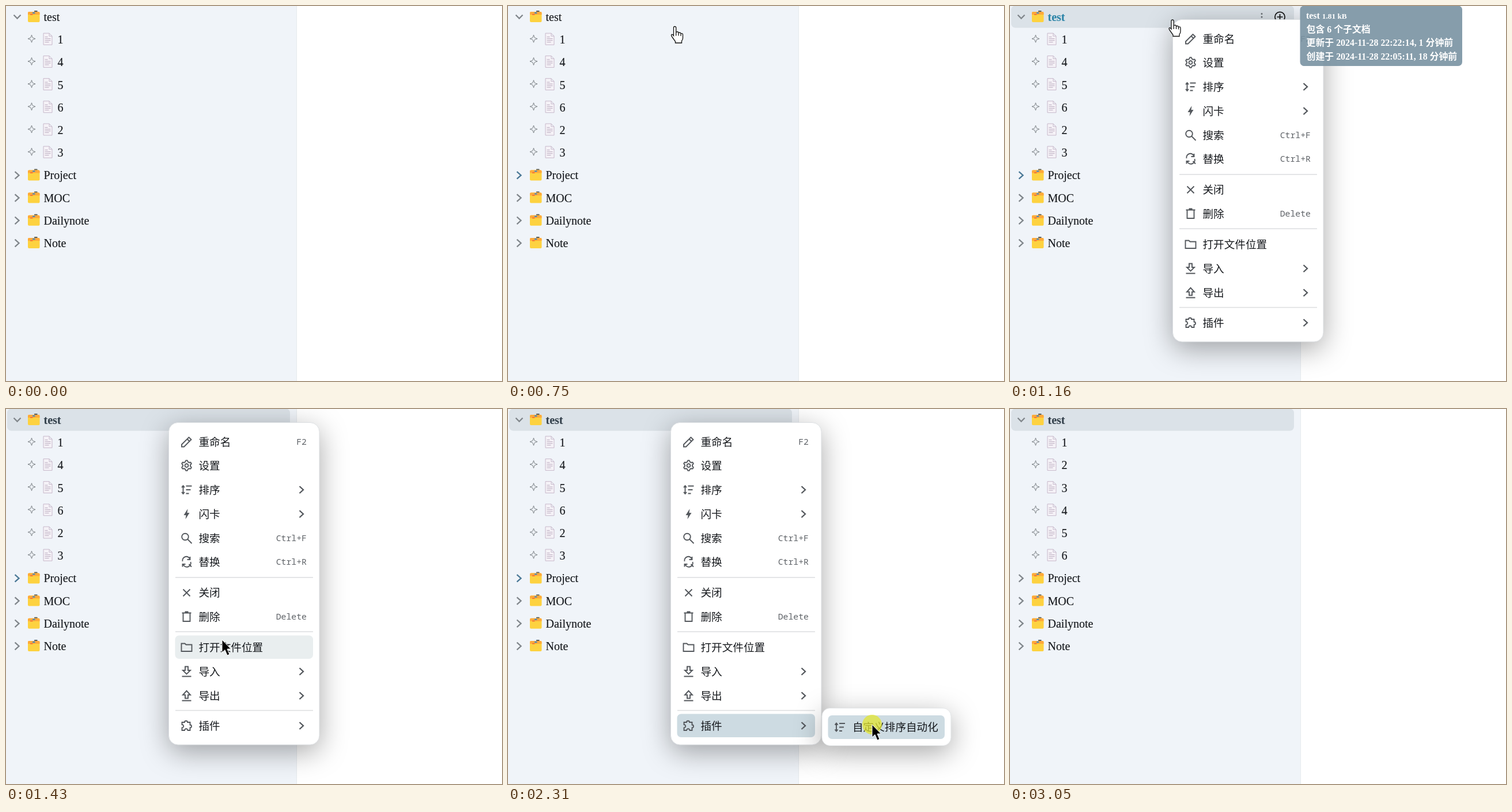
An HTML page that plays this animation: 861 by 650 pixels, repeating every 3710 ms.

```html
<!DOCTYPE html>
<html lang="zh-CN">
<head>
<meta charset="utf-8">
<style>
html, body { margin: 0; width: 100%; height: 100%; overflow: hidden; background: #fff }
svg { display: block; width: 861px; height: 650px }
text { font: 20px "Liberation Serif", "Noto Sans CJK SC", "Noto Sans CJK", serif; fill: #16191d; stroke: #16191d; stroke-width: .15px; white-space: pre }
text.b { font-weight: bold; stroke: none }
text.tip { font-size: 15.9px; font-weight: bold; fill: #fff; stroke: none }
.tip .small { font-size: 13.3px }
text.item { font-size: 18.6px; font-family: "Noto Sans CJK SC", "Noto Sans CJK", sans-serif; stroke: none }
text.key { font: 14.8px "Noto Sans Mono", monospace; fill: #5f6368; stroke: none; text-anchor: end }
.line { fill: none; stroke: #54585d; stroke-width: 1.9 }
.panel { filter: drop-shadow(0 12px 24px rgba(0,0,0,.34)) }
</style>
</head>
<body>
<svg id="stage" viewBox="0 0 861 650"></svg>
<script>
const LOOP = 3710, ROW = 39.2;
const HOVER = '#e9eeef', FOCUS = '#dbe2e8', ACTIVE = '#cddbe2';
const FOLDERS = ['Project', 'MOC', 'Dailynote', 'Note'];

// The screen refreshes in bursts: [first, last, count], on a 10 ms clock
const steps = [0];
for (const [a, b, n] of [[130, 610, 8], [680, 750, 2], [820, 1160, 5], [1210, 1700, 8], [1770, 2180, 7], [2310, 2510, 4], [2910, 3050, 3]])
  for (let i = 0; i < n; i++) steps.push(Math.floor((a + (b - a) * i / (n - 1)) / 10) * 10);

// Pointer path: time, x, y
const path = [
  [130, 585, 575], [190, 500, 425], [260, 425, 300], [330, 378, 205], [400, 354, 140],
  [470, 343, 104], [540, 328, 76], [610, 309, 56], [680, 297, 44], [750, 289.5, 35.5],
  [900, 284, 27], [1160, 282, 24], [1280, 308, 120], [1420, 375, 400], [1490, 405, 535],
  [1560, 430, 552], [1700, 484, 600], [1770, 492, 590], [1840, 512, 562], [1980, 575, 552],
  [2180, 632, 547], [2842, 632, 547], [2910, 640, 562], [2980, 655, 592]
];

const icons = {
  edit: 'M-8.5 8.5V4.5L4-8l4 4L-4.5 8.5zM1-5l4 4',
  gear: gear(),
  sort: 'M-6-6V6M-8.5-4L-6-7l2.5 3M-8.5 4L-6 7l2.5-3M-1-6.5H9M-1 0H7M-1 6.5H4',
  flash: 'M2-9L-5 2H-1L-2 9 5-2H1z',
  search: 'M3.3-2.5A5.8 5.8 0 1 1-8.3-2.5A5.8 5.8 0 1 1 3.3-2.5M2 2l7 7',
  replace: 'M-7-1A6.5 6.5 0 0 1 6-4M6-9v5H1M7 0A5.5 5.5 0 0 1-6 4M-7 8.5V4h5M4 4l4.5 4.5',
  close: 'M-6-6L6 6M6-6L-6 6',
  trash: 'M-6-6.5V8H6V-6.5M-8-6.5H8M-3-8.5H3',
  folder: 'M-9-6.5h6l2 2H9V7H-9z',
  load: 'M-8 8.5H8M-2.5-8.5V-2H-6.5L0 4.5 6.5-2H2.5V-8.5z',
  save: 'M-8 8.5H8M-2.5 4.5V-1.5H-6.5L0-8.5 6.5-1.5H2.5V4.5z',
  plugin: 'M-8-6H-3.5A2.4 2.4 0 1 1 1.5-6H6V-1.5A2.4 2.4 0 1 1 6 3.5V8H2A2.6 2.6 0 0 0-3.5 8H-8V3.5A2.6 2.6 0 0 0-8-2z'
};

// centre y, icon, label, shortcut ('>' opens a submenu)
const menu = [
  [57, 'edit', '重命名', 'F2'], [98, 'gear', '设置'], [140, 'sort', '排序', '>'],
  [182, 'flash', '闪卡', '>'], [224, 'search', '搜索', 'Ctrl+F'], [265, 'replace', '替换', 'Ctrl+R'],
  [318.5, 'close', '关闭'], [360, 'trash', '删除', 'Delete'], [413, 'folder', '打开文件位置'],
  [455, 'load', '导入', '>'], [497, 'save', '导出', '>'], [549, 'plugin', '插件', '>']
];

function gear() {
  const pts = [];
  for (let i = 0; i < 24; i++) {
    const r = i % 4 < 2 ? 9 : 6.6, a = (i - .5) * Math.PI / 12 - Math.PI / 2;
    pts.push((r * Math.cos(a)).toFixed(1) + ' ' + (r * Math.sin(a)).toFixed(1));
  }
  return 'M' + pts.join('L') + 'zM3 0A3 3 0 1 1-3 0A3 3 0 1 1 3 0';
}

const rect = (x, y, w, h, r, fill, more = '') =>
  `<rect x="${x}" y="${y}" width="${w}" height="${h}" rx="${r}" fill="${fill}" ${more}/>`;
const at = (x, y, s) => `<g transform="translate(${x} ${y})">${s}</g>`;
const text = (x, y, s, cls = '', style = '') => `<text x="${x}" y="${y}" class="${cls}" style="${style}">${s}</text>`;
const line = (d, style = '') => `<path d="${d}" class="line" style="${style}"/>`;
const icon = (x, y, name) => at(x, y, line(icons[name], name === 'flash' ? 'fill:#54585d;stroke:none' : ''));

const folderIcon = rect(49, -11, 5.5, 3, .5, '#59605f') + rect(38, -9, 20.5, 18, 2, '#fdd240') +
  '<path d="M38-4V-7q0-2 2-2H56.5q2 0 2 2V-4z" fill="#ffa93a"/>' +
  rect(46, -8, 4.5, 2, 0, '#3f86c4') + rect(42, -5, 4.5, 1.5, 0, '#ef6238');
const starIcon = at(44.5, -1.5, line('M0-6.5L1.7-1.7 6.5 0 1.7 1.7 0 6.5-1.7 1.7-6.5 0-1.7-1.7z', 'stroke:#70757a;stroke-width:.9'));
const docIcon = '<path d="M65-11H75l5 5V9H65zM75-11v5h5" fill="#f5f2f7" stroke="#c7b8ca"/>' +
  line('M67.5-4.5h5M67.5-1.5h10M67.5 1.5h10M67.5 4.5h7', 'stroke:#b8a8bd;stroke-width:1');
const rowTools = '<path d="M437-5.5v.01M437 0v.01M437 5.5v.01" stroke="#6b7075" stroke-width="3" stroke-linecap="round"/>' +
  '<circle cx="468.5" r="8.6" class="line" style="stroke:#111;stroke-width:1.7"/>' + line('M463.5 0h10M468.5-5v10', 'stroke:#111;stroke-width:1.7');

const hand = '<path d="M-2 2Q-2 0 0 0T2.2 2V10Q6 8 6.5 11Q10 9.5 10.5 12.5Q14 11 14 14.5V20Q14 23 12 25V28.5H1V26L-4 19Q-7 15-5.5 14Q-4 13-2 16ZM2.2 10v6M6.5 11v5M10.5 12.5v4" fill="#fff" stroke="#111" stroke-width="1.3"/>';
const arrow = '<path d="M0 0V22L5 17.5 9 27 13 25.3 9 16H15.5Z" fill="#000" stroke="#fff"/>';

function pointer(t) {
  const i = path.findIndex(p => p[0] > t);
  if (i < 0) return path[path.length - 1].slice(1);
  const [a, x, y] = path[i - 1], [b, u, v] = path[i], k = (t - a) / (b - a);
  return [x + (u - x) * k, y + (v - y) * k];
}

function treeRow(i, name, file, look) {
  const y = i * ROW + 19;
  const back = look.back ? rect(2, i * ROW - .5, 491, 38.3, 7, look.back) : '';
  const chevron = i ? 'M15.5-6.3L22.5 0 15.5 6.3' : 'M13.5-3.5l6 6 6-6';
  const label = text(file ? 89.5 : 65.5, 7, name, look.bold ? 'b' : '', look.color ? `fill:${look.color};stroke:${look.color}` : '');
  const marks = file ? starIcon + docIcon : line(chevron, `stroke-width:2.3;stroke:${look.chevron || '#80868b'}`) + folderIcon;
  return back + at(0, y, marks + label + (look.tools ? rowTools : ''));
}

function tree(t, hover) {
  const files = t >= 2500 ? [1, 2, 3, 4, 5, 6] : [1, 4, 5, 6, 2, 3];
  return ['test', ...files, ...FOLDERS].map((name, i) => {
    const over = i === hover, look = {};
    if (over) Object.assign(look, { back: HOVER, color: '#5e8ba5', tools: true });
    if (!i && t >= 1050) Object.assign(look, { back: FOCUS, bold: true, color: over ? '#2f86a9' : '#36434e' });
    if (i === 7 && t >= 260 && t < 2500) look.chevron = '#4a7896';
    return treeRow(i, name, i > 0 && i < 7, look);
  }).join('');
}

function tooltip(y, width, name, size, lines) {
  let s = rect(503.5, y, width, (lines.length + 1) * 23.4 + 11, 7, '#7993a2', 'opacity=".9"');
  s += text(514, y + 22.5, `${name} <tspan class="small">${size}</tspan>`, 'tip');
  lines.forEach((l, i) => s += text(514.5, y + 46.5 + i * 23.3, l, 'tip'));
  return s;
}

function menuPanel(t, x, y) {
  const open = t >= 1480;
  let s = rect(282.5, 23.5, 261.5, 558.5, 16, '#fff', 'stroke="#dcdfe2"');
  s = `<g class="panel">${s}</g>` + line('M294 292H533M294 386H533M294 522.5H533', 'stroke:#dcdddf;stroke-width:1.5');
  for (const [cy, name, label, key] of menu) {
    const plugin = name === 'plugin';
    const over = t > 1210 && t < 1480 && Math.abs(y - cy) < 20.5;
    if (over || plugin && open) s += rect(293.5, cy - 20.5, 239.5, 40.5, 7, plugin && t >= 1830 ? ACTIVE : HOVER);
    s += icon(313.5, cy, name) + text(334.5, cy + 6.5, label, 'item');
    if (key === '>') s += at(513, cy, line('M-3.5-6L3 0-3.5 6', 'stroke-width:2.3'));
    else if (key) s += text(522, cy + 5, key, 'key');
  }
  if (t >= 1550) {
    s += `<g class="panel">${rect(545, 518.5, 224, 65, 14, '#fff', 'stroke="#e2e5e7"')}</g>`;
    if (x > 555 && t > 1770) s += rect(555.5, 531, 202.5, 41, 7, ACTIVE);
    s += icon(576, 551.5, 'sort') + text(598, 558, '自定义排序自动化', 'item');
  }
  return s;
}

function scene(t) {
  const shown = t >= 130 && t < 3040, [x, y] = shown ? pointer(t) : [0, 0];
  const inMenu = t >= 1200;
  let hover = -1;
  if (shown && x < 493 && t < 670) hover = Math.floor(y / ROW);
  if (t >= 820 && !inMenu) hover = 0;

  let s = rect(0, 0, 504, 650, 0, '#f0f4f9') + rect(504, 0, 1, 650, 0, '#e6eaee') + tree(t, hover);
  if (t >= 1050 && t < 2440) s += menuPanel(t, x, y);
  if (t >= 470 && t < 540)
    s += tooltip(78.4, 287, '4', '301 B', ['更新于 2024-11-28 22:05:26, 17 分钟前', '创建于 2024-11-28 22:05:14, 17 分钟前']);
  if (t >= 980 && !inMenu)
    s += tooltip(-.5, 281.5, 'test', '1.81 kB', ['包含 6 个子文档', '更新于 2024-11-28 22:22:14, 1 分钟前', '创建于 2024-11-28 22:05:11, 18 分钟前']);
  if (t >= 2310 && t < 2440) s += '<circle cx="632" cy="547" r="17" fill="#e3e630" opacity=".75"/>';
  if (shown) s += at(x, y, x < 493 && !inMenu ? hand : arrow);
  return s;
}

const stage = document.getElementById('stage');
let last = -1;
function frame() {
  const now = performance.now() % LOOP;
  const t = steps.filter(v => v <= now + .5).pop();
  if (t !== last) stage.innerHTML = scene(last = t);
  requestAnimationFrame(frame);
}
frame();
</script>
</body>
</html>
```
